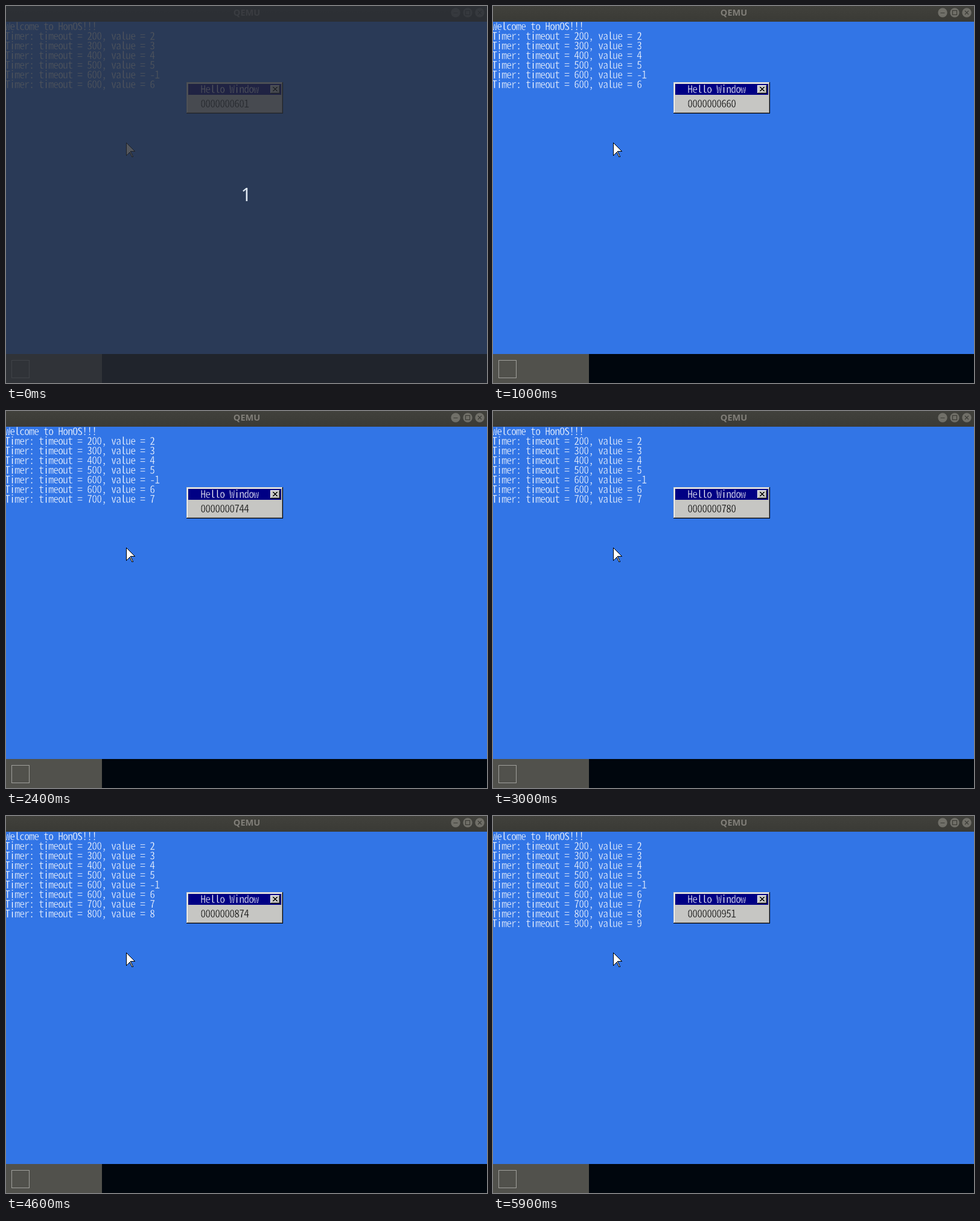
Animation, 797 px wide and 624 px high, one loop 6 s. Source, as an HTML page with a canvas:

```html
<!DOCTYPE html>
<html lang="en">
<head>
<meta charset="utf-8">
<title>QEMU</title>
<style>
  html, body { margin: 0; width: 100%; height: 100%; overflow: hidden; }
  canvas { display: block; }
</style>
</head>
<body>
<canvas id="stage" width="797" height="624"></canvas>
<script>
const ctx = document.getElementById('stage').getContext('2d');
const LOOP = 6000, STEP = 100;
const DESKTOP = '#3275e6', NAVY = '#000084', SILVER = '#c6c6c3', SHADE = '#848484', BAR = '#3c3c37';

function rect(x, y, w, h, color) {
  ctx.fillStyle = color;
  ctx.fillRect(x, y, w, h);
}

function lines(color, width, ...segments) {
  ctx.strokeStyle = color;
  ctx.lineWidth = width;
  ctx.beginPath();
  for (const [x1, y1, x2, y2] of segments) {
    ctx.moveTo(x1, y1);
    ctx.lineTo(x2, y2);
  }
  ctx.stroke();
}

// Text in cells of 8 by 16 pixels; an edge in the background colour thins the strokes.
function consoleText(text, x, top, color, background) {
  ctx.font = '17.5px "Noto Sans Mono CJK JP", "Noto Sans Mono", monospace';
  ctx.textAlign = 'left';
  ctx.letterSpacing = '0px';
  const spacing = 8 - ctx.measureText('0').width;
  const left = x + spacing / 2 - 0.5;
  ctx.letterSpacing = spacing + 'px';
  ctx.fillStyle = color;
  ctx.fillText(text, left, top + 14);
  ctx.strokeStyle = background;
  ctx.lineWidth = 0.4;
  ctx.lineJoin = 'round';
  ctx.strokeText(text, left, top + 14);
  ctx.letterSpacing = '0px';
  ctx.lineJoin = 'miter';
}

function centered(text, x, y, font, color) {
  ctx.font = font;
  ctx.textAlign = 'center';
  ctx.fillStyle = color;
  ctx.fillText(text, x, y);
}

function titleBar() {
  const shade = ctx.createLinearGradient(0, 0, 0, 26);
  shade.addColorStop(0, '#41413c');
  shade.addColorStop(1, '#3a3a35');
  rect(0, 0, 797, 26, shade);
  centered('QEMU', 399, 16, 'bold 14.5px "Noto Sans", "Open Sans", sans-serif', '#807e78');
  ctx.fillStyle = '#706f68';
  for (const x of [745, 765, 785]) {
    ctx.beginPath();
    ctx.arc(x, 11, 7.7, 0, 2 * Math.PI);
    ctx.fill();
  }
  lines(BAR, 1.2, [741.5, 11.5, 748.5, 11.5],
    [782, 8, 788, 14], [788, 8, 782, 14]);
  ctx.strokeRect(761.5, 7.5, 7, 7);
}

function taskBar() {
  rect(0, 576, 797, 48, '#00060d');
  rect(0, 576, 159, 48, '#51514c');
  ctx.strokeStyle = '#a0a09c';
  ctx.lineWidth = 1;
  ctx.strokeRect(9.5, 586.5, 29, 29);
}

function log(count) {
  const rows = ['Welcome to HonOS!!!'];
  const add = (timeout, value) => rows.push(`Timer: timeout = ${timeout}, value = ${value}`);
  for (let k = 2; k * 100 <= count; k++) {
    if (k === 6) add(600, -1);
    add(k * 100, k);
  }
  rows.forEach((row, i) => consoleText(row, -1, 26 + 16 * i, '#fff', DESKTOP));
}

function closeButton() {
  rect(0, 0, 16, 14, '#000');
  rect(0, 0, 15, 13, SHADE);
  rect(0, 0, 15, 1, '#fff');
  rect(0, 0, 1, 13, '#fff');
  rect(1, 1, 13, 11, SILVER);
  for (let i = 0; i < 7; i++) {
    rect(4 + i, 3 + i, 2, 1, '#000');
    rect(10 - i, 3 + i, 2, 1, '#000');
  }
}

function helloWindow(count) {
  ctx.save();
  ctx.translate(299, 126);
  rect(0, 0, 160, 52, '#000');
  rect(0, 0, 159, 51, SILVER);
  rect(1, 1, 158, 50, SHADE);
  rect(1, 1, 157, 49, '#fff');
  rect(2, 2, 156, 48, SILVER);
  rect(3, 3, 154, 18, NAVY);
  consoleText('Hello Window', 24, 4, '#fff', NAVY);
  consoleText(String(count).padStart(10, '0'), 24, 28, '#000', SILVER);
  ctx.translate(139, 5);
  closeButton();
  ctx.restore();
}

// Stair-stepped arrow, built from one-pixel rows with black ends.
function pointer() {
  ctx.save();
  ctx.translate(199, 226);
  for (let y = 0; y < 24; y++) {
    const head = y < 15 ? y + 1 : Math.max(0, 22 - y);
    const tail = Math.floor(y / 2) - 2;
    rect(0, y, head, 1, '#000');
    if (y > 14) rect(tail, y, 3, 1, '#000');
    rect(1, y, y === 14 ? 6 : Math.max(0, head - 2), 1, '#fff');
    if (y > 14 && y < 23) rect(tail + 1, y, 1, 1, '#fff');
  }
  ctx.restore();
}

function countdown() {
  rect(0, 0, 797, 624, 'rgba(40, 44, 52, 0.8)');
  centered('1', 398, 323, '30px "Noto Sans", "Open Sans", sans-serif', '#e0e9f3');
}

// Six ticks per step, losing three along the way.
function ticks(step) {
  if (step === 0) return 601;
  const lost = Math.min(3, Math.max(0, Math.floor((step - 30) / 7)));
  return 600 + 6 * step - lost;
}

function draw() {
  const step = Math.floor(performance.now() % LOOP / STEP);
  const count = ticks(step);
  rect(0, 0, 797, 624, DESKTOP);
  titleBar();
  taskBar();
  log(count);
  helloWindow(count);
  pointer();
  if (step === 0) countdown();
  requestAnimationFrame(draw);
}
draw();
</script>
</body>
</html>
```
